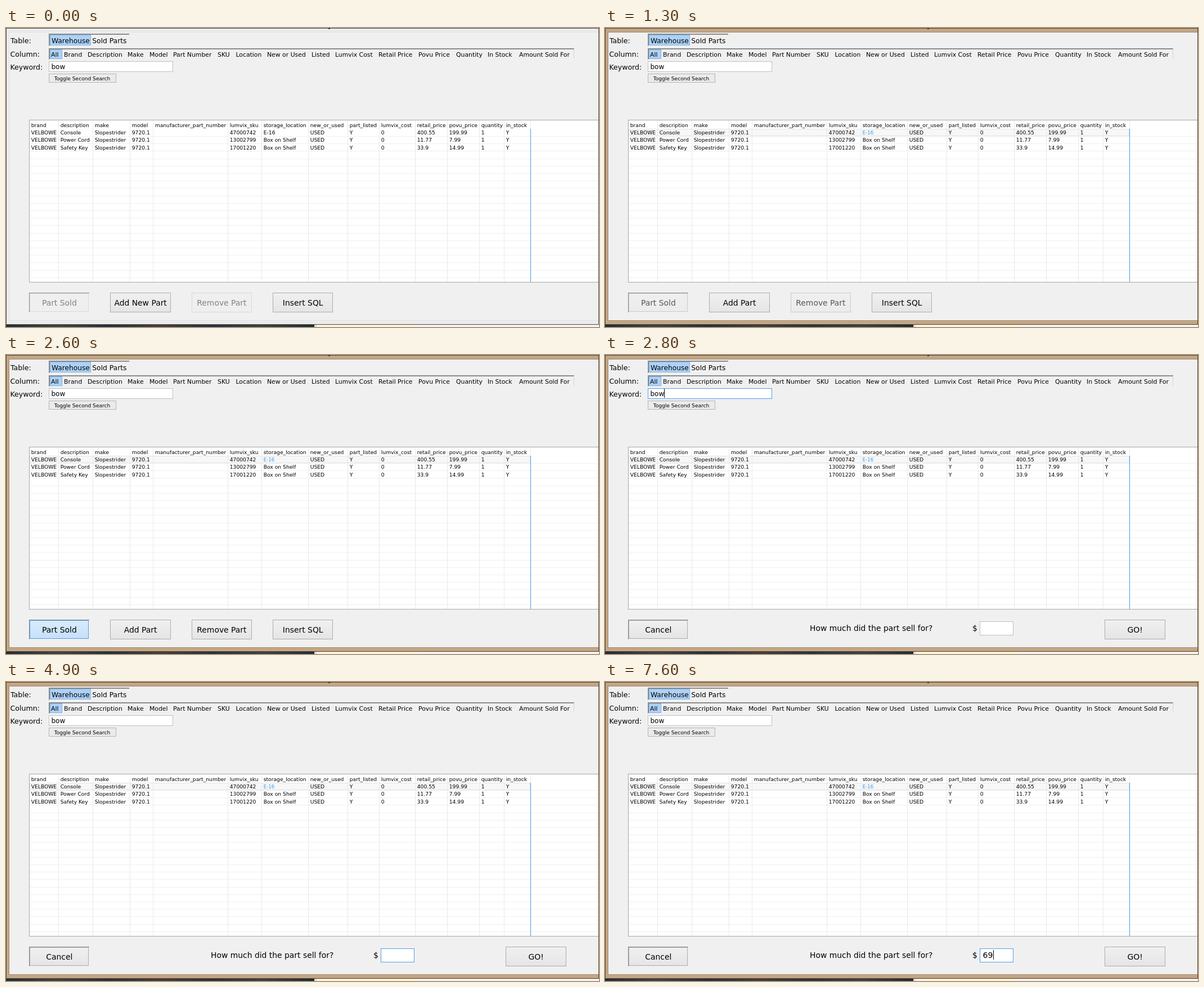
An HTML page with a canvas for the animation above (8 s loop, 1054x531 px).

```html
<!DOCTYPE html>
<html lang="en">
<head>
<meta charset="utf-8">
<title>Parts inventory</title>
<style>
html, body { margin: 0; width: 100%; height: 100%; overflow: hidden; background: #f0f0f0; }
canvas { display: block; }
</style>
</head>
<body>
<canvas id="stage" width="1054" height="531"></canvas>
<script>
const ctx = document.getElementById('stage').getContext('2d');
const LOOP = 8000;

const rect = (x, y, w, h, fill) => { ctx.fillStyle = fill; ctx.fillRect(x, y, w, h); };

function box(x, y, w, h, fill, edge) {
  rect(x, y, w, h, edge);
  rect(x + 1, y + 1, w - 2, h - 2, fill);
}

function text(s, x, y, size, color = '#000', align = 'left') {
  ctx.font = size + 'px "DejaVu Sans", sans-serif';
  ctx.textAlign = align;
  ctx.fillStyle = color;
  ctx.fillText(s, x, y);
}

// Colours are [r, g, b]
const mix = (a, b, k) => a.map((v, i) => v + (b[i] - v) * k);
const css = c => `rgb(${c.map(Math.round)})`;

// Rises from 0 to 1 in n steps of 100 ms; the first step shows at start
const fade = (t, start, n) =>
  Math.min(1, Math.max(0, (Math.floor((t - start) / 100) + 1) / n));

const within = (t, spans) => spans.some(([a, b]) => t >= a && t < b);

// Button looks: top, bottom, edge, label
const LOOK = {
  off:   [[239, 239, 239], [239, 239, 239], [217, 217, 217], [131, 131, 131]],
  on:    [[240, 240, 240], [229, 229, 229], [172, 172, 172], [0, 0, 0]],
  hover: [[236, 244, 252], [220, 236, 252], [126, 180, 234], [0, 0, 0]],
  press: [[218, 236, 252], [196, 224, 252], [86, 157, 229], [0, 0, 0]]
};
const blend = (a, b, k) => LOOK[a].map((c, i) => mix(c, LOOK[b][i], k));

function bevel(x, y, w, h) {
  rect(x, y, w, 1, '#8c8c8c');
  rect(x, y, 1, h, '#8c8c8c');
}

function button(label, x, look, sunken) {
  const [top, bottom, edge, ink] = look.map(css);
  const left = Math.round(x), w = Math.round(x + 107.4) - left;
  const g = ctx.createLinearGradient(0, 471, 0, 504);
  g.addColorStop(0, top);
  g.addColorStop(1, bottom);
  if (sunken) {
    box(left + 1, 471, w - 2, 33, g, edge);
    bevel(left, 470, w, 35);
  } else box(left, 470, w, 35, g, edge);
  text(label, x + 53.8, 493, 13.9, ink, 'center');
}

const GREY = [190, 192, 197], HOVER = [126, 180, 234], FOCUS = [86, 157, 229];

function frame(active) {
  const g = ctx.createLinearGradient(0, 0, 548, 0);
  ['#1f2e37', '#3d4442', '#22313a', '#433f3c', '#26343b', '#394341', '#1f2c34']
    .forEach((c, i) => g.addColorStop(i / 6, c));
  rect(0, 525, 548, 6, g);
  rect(548, 525, 4, 6, '#d8d8d8');
  rect(552, 525, 181, 6, '#fdf2dc');
  rect(733, 525, 321, 6, '#f5f3ef');

  box(0, 0, 1054, 527, active ? '#c4a684' : '#ebebeb', active ? '#4e4234' : '#4a4a4a');
  rect(5, 7, 1048, 513, active ? '#a58c70' : '#e2e2e2');
  rect(6, 8, 1047, 511, '#f0f0f0');
  rect(573, 0, 3, 2, '#333');
}

const FILTERS = [['All', 80], ['Brand', 103], ['Description', 145], ['Make', 216],
  ['Model', 255], ['Part Number', 297], ['SKU', 376], ['Location', 408.5],
  ['New or Used', 464], ['Listed', 543], ['Lumvix Cost', 585], ['Retail Price', 662],
  ['Povu Price', 733], ['Quantity', 800], ['In Stock', 856], ['Amount Sold For', 912]];

function search(t) {
  text('Table:', 8, 26.5, 12.6);
  text('Column:', 7.5, 51, 12.6);
  text('Keyword:', 7.5, 73.5, 12.5);

  bevel(76, 10, 143, 22);
  bevel(77, 11, 142, 20);
  box(78, 12, 73, 19, '#add2f8', '#7fb2e5');
  text('Warehouse', 81, 27, 12.2);
  text('Sold Parts', 153.3, 27, 12.3);

  bevel(76, 36, 934, 20);
  bevel(77, 37, 932, 18);
  rect(1009, 37, 1, 18, '#d4d4d4');
  box(78, 38, 22, 17, '#add2f8', '#7fb2e5');
  for (const [s, x] of FILTERS) text(s, x, 50.5, 10.85);

  const k = fade(t, 2700, 2) - fade(t, 4400, 2);
  box(76, 59, 221, 19, '#fff', css(mix(GREY, FOCUS, k)));
  text('bow', 80.5, 73, 12);
  if (within(t, [[2800, 3300], [3800, 4300]])) rect(105, 60, 1, 16, '#000');

  box(76, 81, 120, 16, '#ebebeb', '#b4b4b4');
  text('Toggle Second Search', 135.5, 92.5, 9.1, '#000', 'center');
}

const COLS = [41, 93, 154, 220, 261, 394, 454, 537, 607, 663, 727, 784, 841, 885, 932];
const ROWS = [
  'brand|description|make|model|manufacturer_part_number|lumvix_sku|storage_location|new_or_used|part_listed|lumvix_cost|retail_price|povu_price|quantity|in_stock',
  'VELBOWE|Console|Slopestrider|9720.1||47000742|E-16|USED|Y|0|400.55|199.99|1|Y',
  'VELBOWE|Power Cord|Slopestrider|9720.1||13002799|Box on Shelf|USED|Y|0|11.77|7.99|1|Y',
  'VELBOWE|Safety Key|Slopestrider|9720.1||17001220|Box on Shelf|USED|Y|0|33.9|14.99|1|Y'
].map(r => r.split('|'));

function table(t) {
  const picked = t >= 1300;
  rect(41, 163, 1012, 289, '#a4a6ab');
  rect(42, 164, 1011, 287, '#fff');
  for (let y = 192; y < 450; y += 13.2) rect(42, Math.round(y), 1011, 1, '#f0f0f0');
  if (picked) box(42, 179, 890, 13, '#f7f7f7', '#e4e4e4');
  else if (t >= 800) box(42, 179, 890, 13, '#e5f3fb', '#a9d8f0');
  for (const x of COLS.slice(1)) rect(x, 164, 1, 287, '#e9e9e9');
  rect(932, 179, 1, 272, '#3d9df0');

  ROWS.forEach((row, r) => row.forEach((s, c) => {
    const link = picked && r === 1 && c === 6;
    text(s, COLS[c] + 3.7, r ? 176 + r * 13.2 : 175.5, link ? 8.6 : 9.2, link ? '#3a9cec' : '#000');
  }));
}

function tools(t) {
  const ready = blend('off', 'on', fade(t, 1300, 3));
  const sold = t >= 2600 ? LOOK.press : t >= 2100 ? blend('on', 'hover', fade(t, 2100, 2)) : ready;
  button('Part Sold', 41, sold, true);
  button(t < 1300 ? 'Add New Part' : 'Add Part', 185.3, LOOK.on);
  button('Remove Part', 329.6, ready);
  button('Insert SQL', 473.9, LOOK.on);
}

function sale(t) {
  button('Cancel', 41, blend('hover', 'on', fade(t, 2700, 2)), true);
  text('How much did the part sell for?', 364, 489.5, 13.9);
  text('$', 653, 490, 13.9);

  const edge = mix(mix(GREY, HOVER, fade(t, 3700, 3)), FOCUS, fade(t, 4200, 4));
  box(666, 473, 60, 25, '#fff', css(edge));
  const typed = t >= 5800 ? '69' : t >= 5600 ? '6' : '';
  text(typed, 671.5, 490, 14);
  if (within(t, [[4300, 4900], [5400, 6200], [6700, 7100], [7600, LOOP]]))
    rect(672 + typed.length * 9, 476, 1, 17, '#000');

  button('GO!', 888.4, blend('on', 'hover', fade(t, 6600, 2) - fade(t, 7500, 2)));
}

function draw(t) {
  frame(t >= 1300);
  search(t);
  table(t);
  (t < 2700 ? tools : sale)(t);
}

const start = performance.now();
function tick() {
  draw((performance.now() - start) % LOOP);
  requestAnimationFrame(tick);
}
tick();
</script>
</body>
</html>
```
